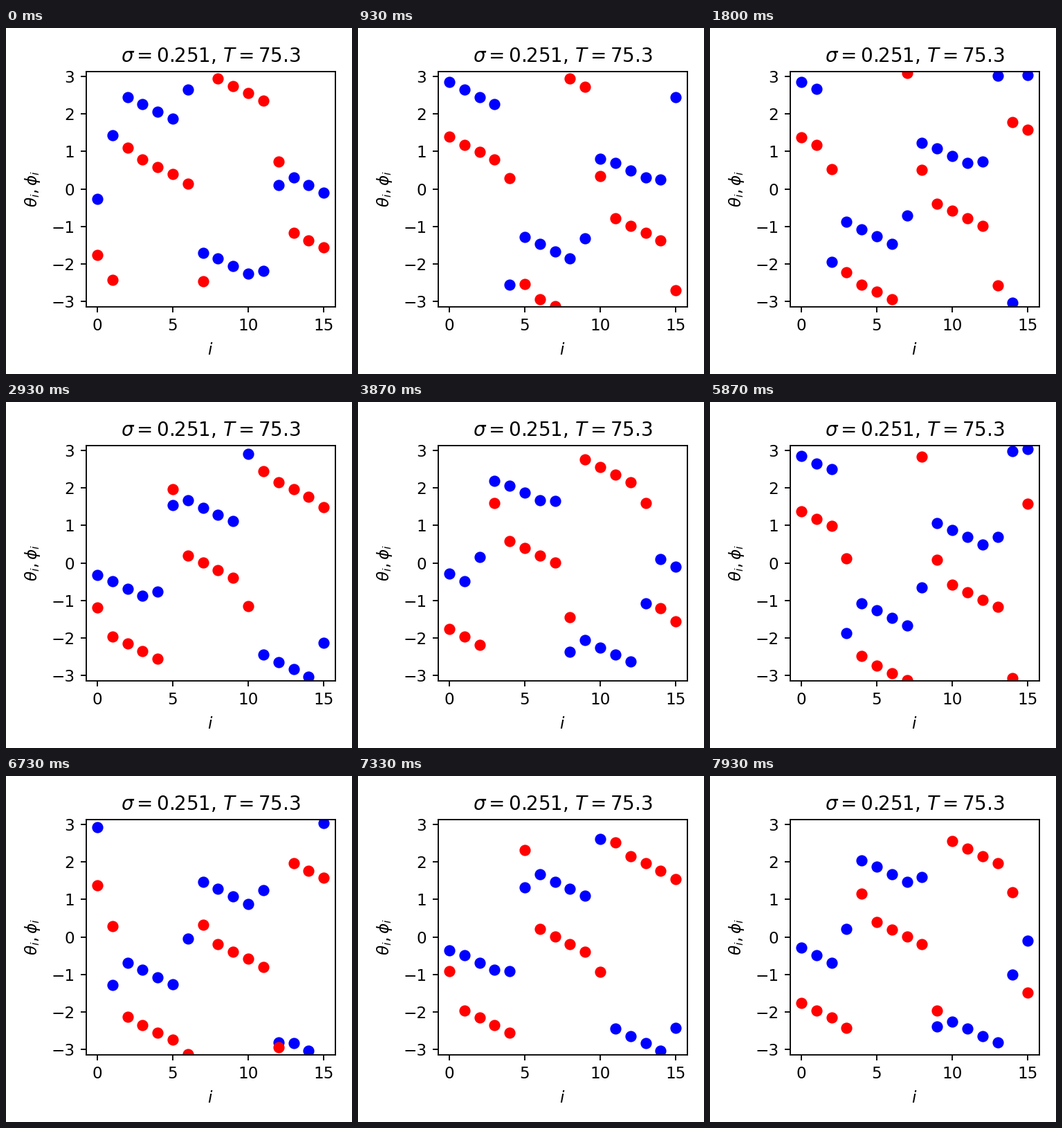
A matplotlib script that plays this animation: 500x500 px, repeating every 8000 ms.

```python
import numpy as np
import matplotlib.pyplot as plt
from matplotlib.animation import FuncAnimation

SIZE, INCHES = 500, 3
N = 16                 # oscillators on a ring
TICKS, TICK_MS = 400, 20
SPEED = 0.16           # sites travelled by each kink per step
GAP = N / 3            # distance between the three kinks
THETA0, PHI0 = 2.85 - np.pi, 1.376 - np.pi

sites = np.arange(N)


def kink(x, slope, cubic):
    """Smooth 0 to 1 step with steepening tails."""
    return 1 / (1 + np.exp(-(slope * x + cubic * x**3)))


def wrap(angle):
    return (angle + np.pi) % (2 * np.pi) - np.pi


def phases(step):
    u = sites + SPEED * step
    turns = np.floor((u + 0.6) / GAP)
    s = u - GAP * turns
    tilt = np.pi * sites / N
    theta = THETA0 - tilt + np.pi * (turns + kink(s - 0.877, 3.6, 2.95))
    phi = PHI0 - tilt - np.pi * (turns + kink(s - 1.373, 4.25, 2.6))
    return wrap(theta), wrap(phi)


plt.rcParams["font.family"] = "DejaVu Sans"
fig = plt.figure(figsize=(INCHES, INCHES), dpi=SIZE / INCHES, facecolor="white")
ax = fig.add_axes([115.5 / SIZE, 97.5 / SIZE, 360 / SIZE, 340 / SIZE])
ax.set_xlim(-0.75, 15.75)
ax.set_ylim(-np.pi, np.pi)
ax.set_xticks(range(0, N, 5))
ax.set_yticks(range(-3, 4))
ax.set_xlabel(r"$i$", labelpad=5.5)
ax.set_ylabel(r"$\theta_i, \phi_i$", labelpad=5.5)
ax.set_title(r"$\sigma=0.251$, $T=75.3$")

theta_dots, = ax.plot([], [], "o", color="blue")
phi_dots, = ax.plot([], [], "o", color="red")


def draw(tick):
    step = (3 * tick + 2) // 10    # 15 steps per second
    theta, phi = phases(step)
    theta_dots.set_data(sites, theta)
    phi_dots.set_data(sites, phi)
    return theta_dots, phi_dots


anim = FuncAnimation(fig, draw, frames=TICKS, interval=TICK_MS,
                     init_func=lambda: draw(0), repeat=True, repeat_delay=0)
plt.show()
```
